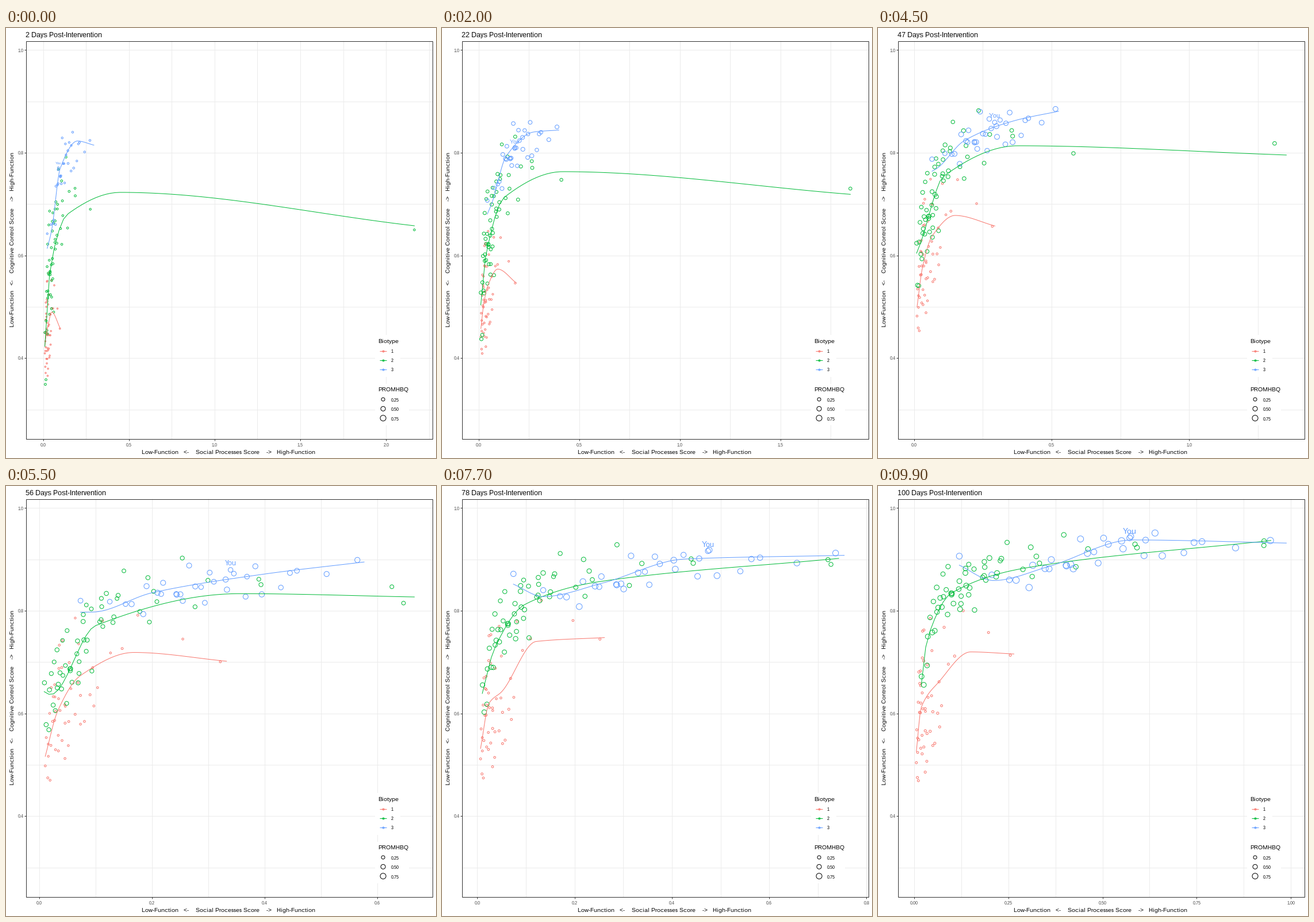
These frames come from a looping animation (748x748 px, 10000 ms). A matplotlib script:

```python
import numpy as np
import matplotlib.pyplot as plt
from matplotlib.animation import FuncAnimation
from matplotlib.collections import LineCollection
from matplotlib.patches import Rectangle

plt.rcParams.update({
    "font.family": "Liberation Sans",
    "text.hinting": "default",
    "text.hinting_factor": 1,
})

SIZE, FRAMES = 748, 100
LEFT, RIGHT, TOP, BOTTOM = 35, 742, 22, 715
FIRST, LAST = 2, 100
RED, GREEN, BLUE = "#F8766D", "#00BA38", "#619CFF"
GRID, DARK, TICK = "#EBEBEB", "#333333", "#4D4D4D"

# Trend knots (social score, cognitive score) on the key days.
KEY_DAYS = [2, 56, 70, 100]
TRENDS = {
    RED: np.array([
        [(.010, .424), (.020, .450), (.030, .466), (.050, .490), (.100, .458)],
        [(.011, .516), (.033, .604), (.074, .675), (.170, .718), (.335, .700)],
        [(.007, .534), (.026, .623), (.046, .637), (.110, .748), (.260, .760)],
        [(.006, .526), (.019, .612), (.065, .661), (.150, .720), (.265, .716)]]),
    GREEN: np.array([
        [(.010, .423), (.045, .584), (.140, .680), (.450, .723), (2.17, .658)],
        [(.009, .643), (.020, .634), (.100, .770), (.360, .833), (.666, .825)],
        [(.007, .633), (.036, .721), (.097, .804), (.235, .847), (.666, .889)],
        [(.019, .655), (.035, .745), (.100, .835), (.300, .884), (.947, .937)]]),
    BLUE: np.array([
        [(.024, .614), (.050, .650), (.100, .770), (.200, .823), (.296, .815)],
        [(.074, .796), (.095, .797), (.200, .835), (.400, .871), (.574, .895)],
        [(.057, .838), (.107, .816), (.220, .842), (.370, .887), (.666, .899)],
        [(.120, .889), (.210, .859), (.360, .887), (.580, .938), (.988, .932)]]),
}


def reach(day):
    """Largest social score on a day."""
    return np.interp(day, [2, 22, 36, 56, 70, 85, 100],
                     [2.165, 1.845, 2.12, .666, .666, .85, .988])


def view(day):
    """Horizontal limits: the data range plus 5 % on both sides."""
    low, high = np.interp(day, [56, 70], [.0103, .0074]), reach(day)
    pad = .05 * (high - low)
    return low - pad, high + pad


def score_px(y):
    return 38 + (1 - y) * 893.3


def smooth(knots, n=80):
    """Monotone cubic through the knots at evenly spaced x."""
    x, y = knots.T
    h, d = np.diff(x), np.diff(y) / np.diff(x)
    m = np.r_[d[0], np.zeros(len(d) - 1), d[-1]]
    for k in range(1, len(d)):
        if d[k - 1] * d[k] > 0:
            m[k] = 2 * d[k - 1] * d[k] / (d[k - 1] + d[k])
    xs = np.linspace(x[0], x[-1], n)
    k = np.clip(np.searchsorted(x, xs) - 1, 0, len(h) - 1)
    t = (xs - x[k]) / h[k]
    ys = ((1 + 2 * t) * (1 - t) ** 2 * y[k] + t * (1 - t) ** 2 * h[k] * m[k]
          + t * t * (3 - 2 * t) * y[k + 1] + t * t * (t - 1) * h[k] * m[k + 1])
    return np.column_stack((xs, ys))


def trend(color, day):
    i = min(max(np.searchsorted(KEY_DAYS, day) - 1, 0), len(KEY_DAYS) - 2)
    t = (day - KEY_DAYS[i]) / (KEY_DAYS[i + 1] - KEY_DAYS[i])
    knots = TRENDS[color][i] * (1 - t) + TRENDS[color][i + 1] * t
    if color == GREEN and day < 56:
        knots[-1, 0] = reach(day)
    return smooth(knots)


def you_at(day):
    days = [2, 56, 85, 100]
    return (np.interp(day, days, [.087, .337, .516, .572]),
            np.interp(day, days, [.767, .879, .928, .942]))


def loner_at(day):
    return (reach(day) * np.interp(day, [36, 56], [1, .94]),
            np.interp(day, [2, 36, 70, 100], [.65, .788, .886, .936]))


class Group:
    """Subjects scattered around one trend, most of them mid-range in log x."""

    def __init__(self, color, count, skew, spread, size, tracked=None):
        self.color, self.spread, self.size, self.tracked = color, spread, size, tracked
        q = np.arange(1, count + 1) / (count + 1)
        z = np.log(q / (1 - q))
        rank = .5 + z / z[-1] / 2 + rng.normal(0, .015, count)
        self.rank = np.clip(rank, 0, 1) ** skew
        self.error = np.clip(rng.normal(0, 1, count), -1.9, 1.9)
        self.vary = rng.uniform(.92, 1.06, count + (tracked is not None))
        self.dots = circles(color, 3)
        self.line, = ax.plot([], [], color=color, lw=1, zorder=4)

    def draw(self, day, t, px):
        path = trend(self.color, day)
        low = path[0, 0]
        high = min(path[-1, 0], .28 + .007 * (day - FIRST))
        x = low * (high / low) ** self.rank
        y = np.interp(x, *path.T) + self.error * np.interp(t, [0, 1], self.spread)
        pts = np.column_stack((x, np.minimum(y, .97)))
        if self.tracked:
            pts = np.vstack((pts, self.tracked(day)))
        self.dots.set_offsets(px(pts))
        self.dots.set_sizes((np.interp(t ** .5, [0, 1], self.size) * self.vary) ** 2)
        self.line.set_data(*px(path).T)


fig = plt.figure(figsize=(SIZE / 72, SIZE / 72), dpi=72, facecolor="white")
ax = fig.add_axes([0, 0, 1, 1])
ax.set(xlim=(-.5, SIZE - .5), ylim=(SIZE - .5, -.5))
ax.axis("off")


def text(x, y, s, size, color="black", **kw):
    return ax.text(x, y, s, fontsize=size, color=color, **kw)


def segments(color, z, lines=()):
    return ax.add_collection(
        LineCollection(list(lines), colors=color, linewidths=1, zorder=z), autolim=False)


def circles(color, z, at=(), size=1):
    dots = ax.scatter([], [], facecolors="none", edgecolors=color, linewidths=1, zorder=z)
    if at:
        dots.set_offsets([at])
        dots.set_sizes([size ** 2])
    return dots


def box(x0, y0, x1, y1, z, **kw):
    ax.add_patch(Rectangle((x0, y0), x1 - x0, y1 - y0, zorder=z, **kw))


# Fixed parts
segments(GRID, 1, [[(LEFT, y), (RIGHT, y)] for y in score_px(np.arange(3, 11) / 10)])
for v in (.4, .6, .8, 1):
    y = score_px(v)
    segments(DARK, 6, [[(LEFT - 3, y), (LEFT, y)]])
    text(30, y + 3, f"{v:.1f}", 8, TICK, ha="right")
box(LEFT, TOP, RIGHT, BOTTOM, 7, fill=False, edgecolor=DARK, linewidth=1)
AXIS = "Low-Function   <-    {} Score    ->   High-Function"
text(387, 741, AXIS.format("Social Processes"), 10, ha="center")
text(11, 368, AXIS.format("Cognitive Control"), 10, ha="center", va="center", rotation=90)
title = text(34, 16, "", 12)

# Legend
box(642, 534, 686, 607, 8, facecolor="white")
box(642, 619, 701, 691, 8, facecolor="white")
text(647, 548, "Biotype", 10, zorder=9)
text(647, 632, "PROMHBQ", 10, zorder=9)
for i, color in enumerate((RED, GREEN, BLUE)):
    y = 562 + 16 * i
    segments(color, 9, [[(650, y), (662, y)]])
    circles(color, 9, (656, y), 3)
    text(669, y + 3, str(i + 1), 8, zorder=9)
    y = 645.5 + 16.3 * i
    circles("black", 9, (655.5, y), 6 + 2 * i)
    text(669, y + 4, f"{.25 * (i + 1):.2f}", 8, zorder=9)

# Moving parts
x_grid, x_ticks = segments(GRID, 1), segments(DARK, 6)
x_labels = [text(0, 728, "", 8, TICK, ha="center") for _ in range(8)]
rng = np.random.default_rng(4)
groups = [
    Group(RED, 50, 1.3, (.05, .075), (2.4, 3.8)),
    Group(GREEN, 57, 1, (.065, .03), (3.5, 8.2), loner_at),
    Group(BLUE, 31, .6, (.026, .016), (3.2, 10.8), you_at),
]
you = text(0, 0, "You", 8, BLUE, ha="center", zorder=5)


def draw(frame):
    t = frame / (FRAMES - 1)
    day = FIRST + (LAST - FIRST) * t
    low, high = view(day)

    def px(points):
        x, y = np.asarray(points).T
        return np.column_stack(
            (LEFT + (x - low) / (high - low) * (RIGHT - LEFT), score_px(y)))

    title.set_text(f"{round(day)} Days Post-Intervention")

    step = .2 if high < .96 else .25 if high < 1.3 else .5
    marks = np.arange(0, high, step / 2)
    xs = px(np.column_stack((marks, marks)))[:, 0]
    x_grid.set_segments([[(x, TOP), (x, BOTTOM)] for x in xs])
    x_ticks.set_segments([[(x, BOTTOM), (x, BOTTOM + 3)] for x in xs[::2]])
    for i, label in enumerate(x_labels):
        on = 2 * i < len(xs)
        label.set_visible(on)
        if on:
            label.set_x(xs[2 * i])
            label.set_text(f"{marks[2 * i]:.{2 if step == .25 else 1}f}")

    for group in groups:
        group.draw(day, t, px)

    size = 6 + 7.5 * t ** .5
    x, y = px([you_at(day)])[0]
    you.set_position((x, y - 12 + size * .36))
    you.set_fontsize(size)
    return []


anim = FuncAnimation(fig, draw, frames=FRAMES, interval=100, repeat=True, repeat_delay=0)
plt.show()
```
